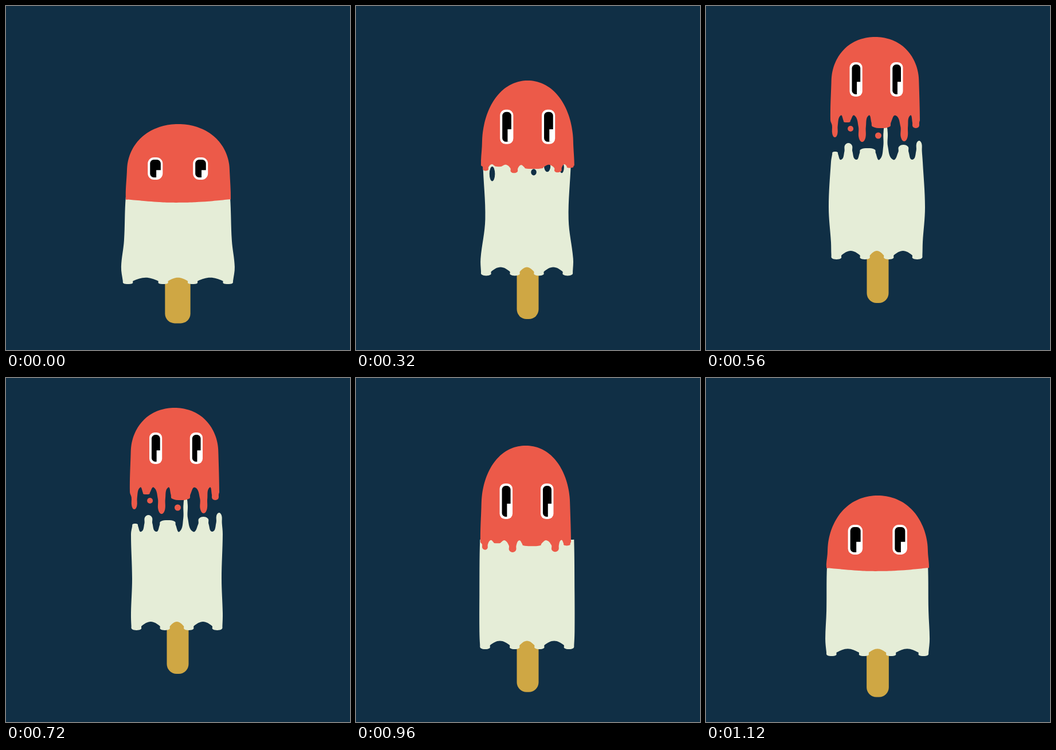
Animation of 600 by 600 pixels, one loop 1200 ms. Source, as an HTML page with a canvas:

```html
<!DOCTYPE html>
<html lang="en">
<head>
<meta charset="utf-8">
<title>Melting ice pop</title>
<style>
  html, body { margin: 0; width: 100%; height: 100%; overflow: hidden; background: #102f45; }
  canvas { display: block; width: 600px; height: 600px; }
</style>
</head>
<body>
<canvas id="stage" width="600" height="600"></canvas>
<script>
const ctx = document.getElementById('stage').getContext('2d');
const NAVY = '#102f45', RED = '#ec5a49', CREAM = '#e5edd7', WOOD = '#cfa744';
const STEP = 80, STEPS = 15;

// Key steps, and the value of each property at them
const keys = [0, 1, 2, 5, 7, 9, 12, 14];
const tracks = {
  top:      [206, 216, 191, 101, 54, 52, 118, 205],
  seam:     [337, 343, 318, 256, 199, 199, 286, 331],
  redX:     [300.5, 301, 299.5, 299, 295, 294, 296, 299.5],
  redW:     [91.5, 97, 88.5, 79, 78, 78, 79, 89.5],
  shoulder: [84, 82, 102, 114, 80, 80, 107, 102],
  melt:     [0, 0, 0, 0.5, 1, 1, 0.45, 0],
  tear:     [0, 0, 0, 1, 0, 0, 0, 0],
  creamTop: [91, 97, 87, 74, 80, 80, 82, 88],
  creamMid: [94, 100, 86, 70, 84, 78, 83, 89],
  creamLow: [99, 105, 86, 80, 80, 80, 83, 91],
  hem:      [485, 487, 485, 462, 442, 440, 473, 485],
  eyeY:     [264, 272, 238, 153, 98, 95, 184, 256],
  eyeH:     [39, 36, 56, 60, 60, 55, 62, 52]
};

// Teeth: place from -1 to 1, length, half width
const drips = [[-0.9, 30, 5], [-0.63, 4, 6], [-0.29, 38, 6.5], [0.135, 14, 17], [0.65, 37, 6.5], [0.91, 14, 6]];
const crown = [[-0.91, 6, 5], [-0.62, 21, 7], [-0.2, 12, 14], [0.19, 50, 4], [0.58, 18, 9], [0.92, 25, 5]];
const lobes = [-0.88, -0.26, 0.26, 0.88].map(u => [u, 20, 9]);

// Gaps in the seam: place, drop below it, radii
const gaps = [[-0.76, 15, 6, 16], [0.13, 12, 6, 7], [0.42, 2, 7, 12], [0.73, 4, 5, 12]];

// Hermite blend of every track around the loop
function poseAt(s) {
  const n = keys.length;
  let i = n - 1;
  while (keys[i] > s) i--;
  const near = [i - 1, i, i + 1, i + 2];
  const [t0, t1, t2, t3] = near.map(k => keys[(k + n) % n] + STEPS * Math.floor(k / n));
  const d = t2 - t1, u = (s - t1) / d, pose = {};
  for (const name in tracks) {
    const [a, b, c, e] = near.map(k => tracks[name][(k + n) % n]);
    pose[name] = b + (c - b) * u * u * (3 - 2 * u)
      + d * u * (1 - u) ** 2 * (c - a) / (t2 - t0)
      + d * u * u * (u - 1) * (e - b) / (t3 - t1);
  }
  return pose;
}

// Row of rounded teeth, left to right; negative grow points up
function fringe(teeth, cx, half, base, grow, sag = 0) {
  const pts = [];
  const add = (x, y) => pts.push([x, y + sag * Math.cos((x - cx) / half * Math.PI / 2)]);
  let last;
  for (const [u, len, w] of teeth) {
    const x = cx + u * half, reach = len * grow;
    if (last !== undefined) add((last + x - w) / 2, base - 8 * Math.abs(grow) * Math.sign(grow));
    add(x - w, base + reach * 0.3);
    add(x - w * 0.9, base + reach * 0.8);
    add(x, base + reach);
    add(x + w * 0.9, base + reach * 0.8);
    add(x + w, base + reach * 0.3);
    last = x + w;
  }
  return pts;
}

// Superellipse arch standing on short, slightly flared sides
function dome({ top, seam, redX, redW, shoulder }) {
  const pts = [[redX - redW, seam]], n = 20;
  const bulge = v => Math.sign(v) * Math.abs(v) ** 0.95;
  for (let i = 0; i <= n; i++) {
    const a = Math.PI * i / n;
    pts.push([
      redX - redW * 0.98 * bulge(Math.cos(a)),
      top + shoulder * (1 - bulge(Math.max(0, Math.sin(a))))
    ]);
  }
  pts.push([redX + redW, seam]);
  return pts;
}

// Closed smooth curve; handles scale with each segment
function blob(pts, color) {
  const n = pts.length, p = i => pts[(i + n) % n];
  const dir = i => {
    const x = p(i + 1)[0] - p(i - 1)[0], y = p(i + 1)[1] - p(i - 1)[1];
    const len = Math.hypot(x, y) || 1;
    return [x / len, y / len];
  };
  ctx.fillStyle = color;
  ctx.beginPath();
  ctx.moveTo(...pts[0]);
  for (let i = 0; i < n; i++) {
    const a = p(i), b = p(i + 1), da = dir(i), db = dir(i + 1);
    const r = Math.hypot(b[0] - a[0], b[1] - a[1]) * 0.35;
    ctx.bezierCurveTo(a[0] + da[0] * r, a[1] + da[1] * r, b[0] - db[0] * r, b[1] - db[1] * r, b[0], b[1]);
  }
  ctx.fill();
}

function pill(x, y, w, h, r, color) {
  ctx.fillStyle = color;
  ctx.beginPath();
  ctx.roundRect(x, y, w, h, r);
  ctx.fill();
}

function oval(x, y, rx, ry, color) {
  ctx.fillStyle = color;
  ctx.beginPath();
  ctx.ellipse(x, y, rx, ry, 0, 0, Math.PI * 2);
  ctx.fill();
}

function eye(cx, y, w, h) {
  const x = cx - w / 2;
  pill(x, y, w, h, w * 0.42, '#fff');
  pill(x + 4, y + 4, w - 7.5, h - 8, 6.5, '#000');
  pill(x + w * 0.57, y + h * 0.57, w * 0.43 - 3, h * 0.43 - 4, [0, 0, 5, 0], '#fff');
}

function draw(pose) {
  const { seam, redX, redW, melt, hem, creamTop, creamMid, creamLow } = pose;
  const apart = Math.min(1, Math.max(0, melt * 2 - 1));
  const tear = Math.max(0, pose.tear);
  const spread = creamLow - 80;
  const creamX = 298 + spread * 0.1;
  const creamY = seam - 4 + 65 * apart;

  ctx.fillStyle = NAVY;
  ctx.fillRect(0, 0, 600, 600);

  const stickW = 38 + Math.max(0, spread - 10) * 0.7;
  const foot = hem + 76 - spread * 0.4;
  pill(299.5 - stickW / 2, hem - 40, stickW, foot - hem + 40, 17, WOOD);

  const ruffle = (15 - spread * 0.2) / 28;
  const side = dir => [
    [creamX + dir * creamTop, creamY + 12 * apart],
    [creamX + dir * creamMid, (creamY + hem) / 2],
    [creamX + dir * creamLow, hem - 30]
  ];
  blob([
    ...side(-1).reverse(),
    ...fringe(crown, creamX, creamTop, creamY, -apart),
    ...side(1),
    ...fringe(lobes, creamX, creamLow, hem - 20 * ruffle, ruffle).reverse()
  ], CREAM);

  for (const [u, dy, rx, ry] of gaps) oval(redX + u * redW, seam + dy, rx * tear, ry * tear, NAVY);

  const sag = 6 * (1 - melt) ** 3;
  blob([...dome(pose), ...fringe(drips, redX, redW, seam, melt, sag).reverse()], RED);
  oval(redX - 0.55 * redW, seam + 15, 5 * apart, 5 * apart, RED);
  oval(redX + 0.07 * redW, seam + 27, 5.5 * apart, 5.5 * apart, RED);

  const eyeX = (redX + 299) / 2, reach = 35.7 + (redW - 79) * 0.3;
  for (const dir of [-1, 1]) eye(eyeX + dir * reach, pose.eyeY, redW * 0.285, pose.eyeH);
}

function tick() {
  draw(poseAt(Math.floor(performance.now() / STEP) % STEPS));
  requestAnimationFrame(tick);
}
tick();
</script>
</body>
</html>
```
